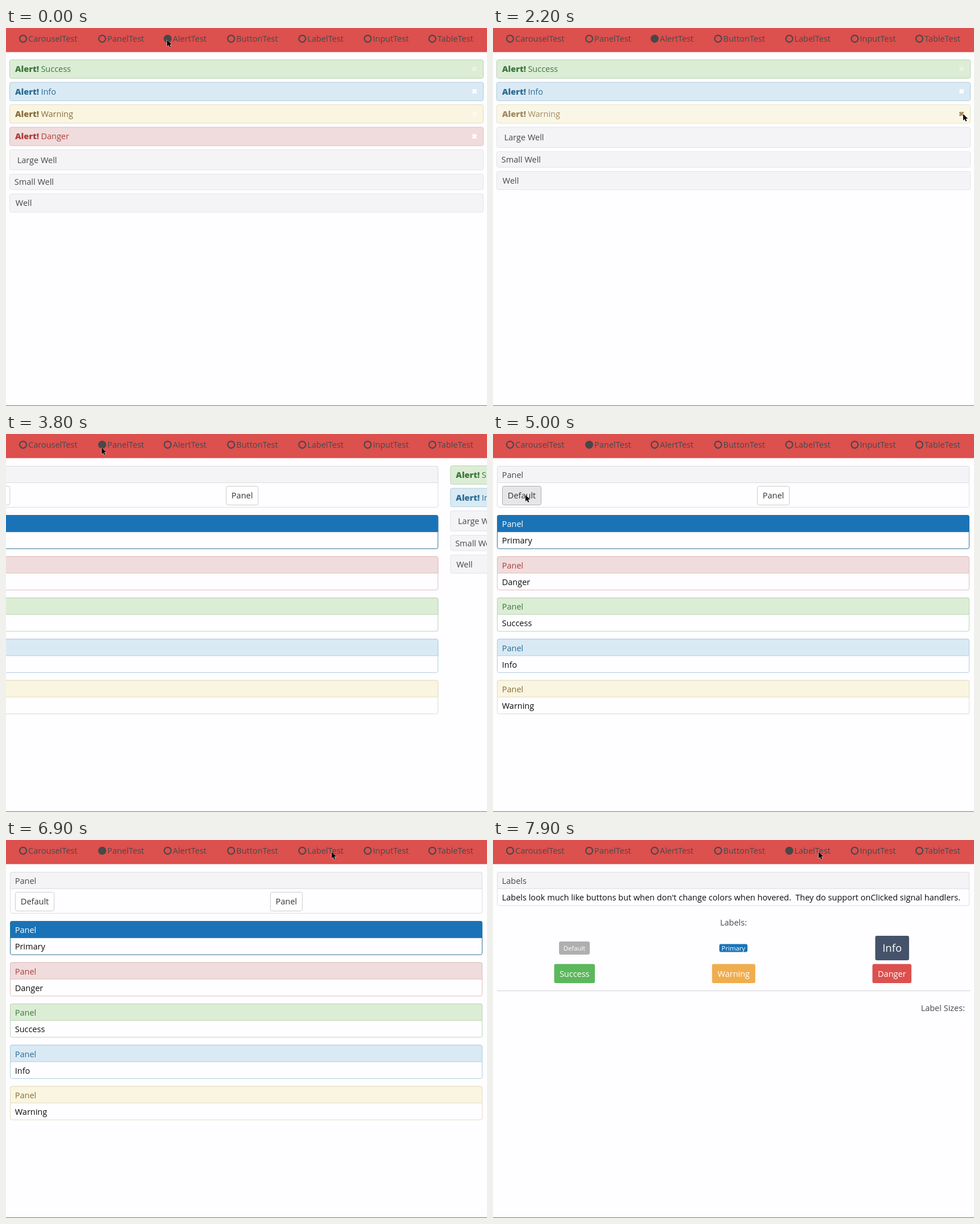
These frames come from a looping animation (845 px wide and 663 px high, 8000 ms). An HTML page:

```html
<!DOCTYPE html>
<html lang="en">
<head>
<meta charset="utf-8">
<title>Widget gallery</title>
<style>
  html, body { margin: 0; width: 100%; height: 100%; overflow: hidden; background: #fefdff; }
  svg { display: block; width: 845px; height: 663px; }
  text { font: 14.5px "Open Sans", "Noto Sans", sans-serif; white-space: pre; }
</style>
</head>
<body>
<svg id="stage" viewBox="0 0 845 663" xmlns="http://www.w3.org/2000/svg"></svg>
<script>
const LOOP = 8000, STEP = 100, PAGE = 852, ALERT_PITCH = 39.4;
const DARK = '#484848', RED = '#dc504e', BLUE = '#1a73b7';
const stage = document.getElementById('stage');

function add(parent, tag, attrs = {}, content = '') {
  const node = document.createElementNS(stage.namespaceURI, tag);
  for (const key in attrs) node.setAttribute(key, attrs[key]);
  node.textContent = content;
  return parent.appendChild(node);
}
const group = parent => add(parent, 'g');
const label = (parent, x, y, content, fill = DARK, more = {}) =>
  add(parent, 'text', { x, y, fill, ...more }, content);
const box = (parent, x, y, width, height, fill, stroke = 'none', rx = 3) =>
  add(parent, 'rect', { x, y, width, height, fill, stroke, rx });
const move = (node, x, y = 0) => node.setAttribute('transform', `translate(${x} ${y})`);

const tones = {
  plain:   { fill: '#f4f3f5', edge: '#dddce0', ink: DARK },
  primary: { fill: BLUE, edge: '#2e7593', ink: '#fff' },
  success: { fill: '#dcedd6', edge: '#bcd3b5', ink: '#3c763d', cross: '#e9f3e5' },
  info:    { fill: '#d9eaf5', edge: '#b0cddb', ink: '#2d6b92', cross: '#fff' },
  warning: { fill: '#faf5e0', edge: '#e3dcc3', ink: '#8a6d3b', cross: '#fdfaf0' },
  danger:  { fill: '#f0dcdc', edge: '#dcbfbf', ink: '#a83f3c', cross: '#fff' }
};

// Pages
const pages = { 1: group(stage), 2: group(stage), 4: group(stage) };

const alerts = ['Success', 'Info', 'Warning', 'Danger'].map((name, i) => {
  const g = group(pages[2]), tone = tones[name.toLowerCase()], top = 55.8 + i * ALERT_PITCH;
  box(g, 6.5, top, 832, 32.4, tone.fill, tone.edge);
  label(g, 16, top + 21.4, 'Alert!', tone.ink, { 'font-weight': 800, style: 'font-weight:800' });
  label(g, 61.4, top + 21.4, name, tone.ink);
  const cross = add(g, 'path', {
    d: `M819.7 ${top + 12.7}l6.6 6.6m0 -6.6l-6.6 6.6`, 'stroke-width': 3.2, fill: 'none'
  });
  return { g, cross, tone };
});

const wells = group(pages[2]);
[['Large Well', 19.7, 213.5, 35.5], ['Small Well', 14.8, 256.3, 27.3], ['Well', 16.8, 291, 32]]
  .forEach(([name, x, y, height]) => {
    box(wells, 6.5, y, 832, height, tones.plain.fill, '#e4e3e6');
    label(wells, x, y + height / 2 + 5.4, name);
  });

function panel(parent, top, height, tone, title, body = '') {
  box(parent, 7.5, top, 829, height, '#fefdff', tone.edge);
  add(parent, 'path', {
    d: `M7.5 ${top + 29}V${top + 3}q0 -3 3 -3H833.5q3 0 3 3V${top + 29}z`,
    fill: tone.fill, stroke: tone.edge
  });
  label(parent, 15.7, top + 20.8, title, tone.ink);
  label(parent, 15.7, top + 49.8, body, '#0c0c0c');
}

function button(parent, x, width, name) {
  const face = box(parent, x, 91.5, width, 33, '#fff', '#ccc');
  label(parent, x + width / 2, 112.8, name, '#333', { 'text-anchor': 'middle' });
  return { face, x, width };
}

panel(pages[1], 56.5, 72, tones.plain, 'Panel');
const buttons = [button(pages[1], 16.5, 68, 'Default'), button(pages[1], 464.5, 56, 'Panel')];
['Primary', 'Danger', 'Success', 'Info', 'Warning'].forEach((name, i) =>
  panel(pages[1], 142.6 + i * 72.4, 58.6, tones[name.toLowerCase()], 'Panel', name));

panel(pages[4], 56.5, 58.5, tones.plain, 'Labels',
  "Labels look much like buttons but when don't change colors when hovered.\u00a0 They do support onClicked signal handlers.");
label(pages[4], 422.5, 150, 'Labels:', DARK, { 'text-anchor': 'middle' });
[
  ['Default', 143, 189.5, 54, 23, '#b0afb0', 11.3],
  ['Primary', 422.3, 189.5, 49.5, 14, BLUE, 11.3],
  ['Info', 701.2, 189.5, 59.5, 43, '#44536a', 18.5],
  ['Success', 143.2, 234.3, 71.5, 33.5, '#5cb85c', 14.5],
  ['Warning', 422.8, 234.3, 76, 33.5, '#f0ad4e', 14.5],
  ['Danger', 700.8, 234.3, 68.5, 33.5, RED, 14.5]
].forEach(([name, x, y, width, height, fill, size]) => {
  box(pages[4], x - width / 2, y - height / 2, width, height, fill);
  label(pages[4], x, y + size * 0.36, name, '#fff',
    { 'text-anchor': 'middle', style: `font-size:${size}px` });
});
add(pages[4], 'path', { d: 'M7 264.5H838.5', stroke: '#cfced1' });
label(pages[4], 829, 299.6, 'Label Sizes:', DARK, { 'text-anchor': 'end' });

// Tab bar
add(stage, 'rect', { width: 845, height: 42.3, fill: RED });
const radios = [
  ['Carousel', 30], ['Panel', 169], ['Alert', 284], ['Button', 395.5],
  ['Label', 520.5], ['Input', 635.5], ['Table', 749]
].map(([name, x]) => {
  label(stage, x + 9, 24.2, name + 'Test');
  return add(stage, 'circle', { cx: x, cy: 18.8, r: 6, stroke: DARK, 'stroke-width': 2.2 });
});
add(stage, 'rect', { y: 662, width: 845, height: 1, fill: '#777' });

const cursor = add(stage, 'path', {
  d: 'M0 0V11.2L2.6 8.8L4.4 12.8L6.4 11.9L4.6 8H8.2Z',
  fill: '#000', stroke: '#fff', 'stroke-width': 1, 'paint-order': 'stroke'
});

// Motion
const clamp = v => Math.min(1, Math.max(0, v));
const progress = (t, start, duration) => clamp((t - start) / duration);
const easeOut = p => 1 - (1 - p) ** 3;
const easeInOut = p => p * p * (3 - 2 * p);

const cursorKeys = [
  [0, 283, 21], [150, 283, 21], [900, 816, 196], [1100, 824, 190], [1750, 824, 190],
  [2000, 826, 151], [2500, 826, 151], [3250, 169, 25], [3600, 168, 24], [4000, 168, 24],
  [4700, 57, 107], [5200, 57, 107], [5700, 492, 107], [6150, 492, 107], [6750, 572, 21],
  [LOOP, 572, 21]
];

function cursorAt(t) {
  const i = cursorKeys.findIndex(key => key[0] > t);
  const [t0, x0, y0] = cursorKeys[i - 1], [t1, x1, y1] = cursorKeys[i];
  const p = easeInOut((t - t0) / (t1 - t0));
  return [x0 + (x1 - x0) * p, y0 + (y1 - y0) * p];
}

const dismissals = { 2: [2150, 250], 3: [1400, 300] };
const toPanel = 3580, toLabel = 7140, slide = 400;

function render(t) {
  const [x, y] = cursorAt(t);
  move(cursor, x, y);

  const scroll = 2 - easeOut(progress(t, toPanel, slide)) + 3 * easeOut(progress(t, toLabel, slide));
  for (const i in pages) move(pages[i], (i - scroll) * PAGE);

  const active = t < toPanel ? 2 : t < toLabel ? 1 : 4;
  radios.forEach((radio, i) => radio.setAttribute('fill', i === active ? DARK : 'none'));

  let closed = 0;
  alerts.forEach(({ g, cross, tone }, i) => {
    const gone = dismissals[i] ? progress(t, ...dismissals[i]) : 0;
    if (gone === 1) closed++;
    g.setAttribute('opacity', 1 - gone);
    const hovered = x > 816 && Math.abs(y - 72 - i * ALERT_PITCH) < 7;
    cross.setAttribute('stroke', hovered ? tone.ink : tone.cross);
  });
  move(wells, 0, -closed * ALERT_PITCH);

  buttons.forEach(b => {
    const hovered = x > b.x && x < b.x + b.width && y > 91 && y < 125;
    b.face.setAttribute('fill', hovered ? '#e6e5e7' : '#fff');
    b.face.setAttribute('stroke', hovered ? '#b0afb1' : '#ccc');
  });
}

const begin = performance.now();
function tick() {
  const t = (performance.now() - begin) % LOOP;
  render(Math.floor(t / STEP) * STEP);
  requestAnimationFrame(tick);
}
tick();
</script>
</body>
</html>
```
